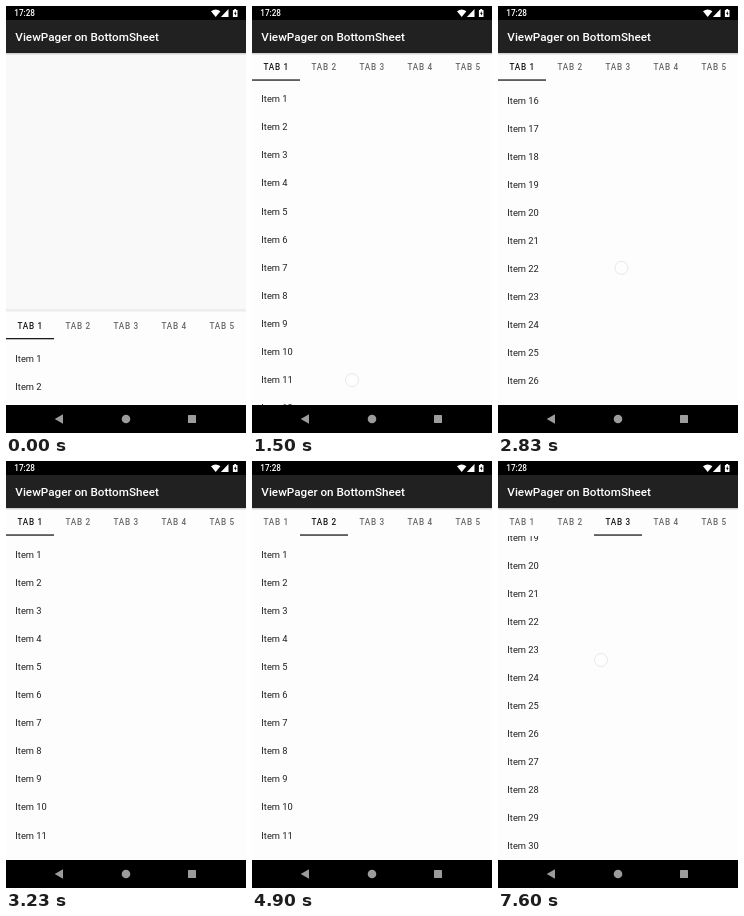
An HTML page that plays this animation: 240x427 px, repeating every 8 s.

```html
<!DOCTYPE html>
<html lang="en">
<head>
<meta charset="utf-8">
<title>ViewPager on BottomSheet</title>
<style>
  html, body { margin: 0; width: 100%; height: 100%; overflow: hidden; background: #000; }
  svg { display: block; width: 100vw; height: 100vh; font-family: Roboto, "Noto Sans", sans-serif; }
  .title { font-size: 11.68px; font-weight: 500; fill: #fff; }
  .clock { font-size: 8.17px; font-weight: 500; fill: #fff; }
  .tab { font-size: 8.17px; font-weight: 500; letter-spacing: .0892em; text-anchor: middle; }
  .item { font-size: 9.34px; fill: #202020; }
</style>
</head>
<body>
<svg viewBox="0 0 240 427">
  <defs>
    <clipPath id="listClip"><rect y="75" width="240" height="400"/></clipPath>
    <clipPath id="tabClip"><rect y="47" width="240" height="28"/></clipPath>
    <linearGradient id="up" x2="0" y2="1">
      <stop offset="0" stop-opacity="0"/><stop offset="1" stop-opacity=".08"/>
    </linearGradient>
    <linearGradient id="down" x2="0" y2="1">
      <stop offset="0" stop-opacity=".2"/><stop offset="1" stop-opacity="0"/>
    </linearGradient>
  </defs>

  <rect y="47" width="240" height="352" fill="#f9f9f9"/>
  <g id="sheet">
    <rect y="43" width="240" height="4" fill="url(#up)"/>
    <rect y="47" width="240" height="352" fill="#fdfdfd"/>
    <g clip-path="url(#listClip)"><g id="list"></g></g>
    <g clip-path="url(#tabClip)"><circle id="ripple" cy="61" r="0"/></g>
    <g id="tabs"></g>
    <rect id="bar" y="73.4" width="48" height="1.3" fill="#1c1c1c"/>
  </g>
  <circle id="touch" r="6.5" fill="#fff" fill-opacity=".4" stroke="#e9e9e9"/>

  <rect y="47" width="240" height="2.5" fill="url(#down)"/>
  <rect y="14" width="240" height="33" fill="#212121"/>
  <rect width="240" height="14" fill="#000"/>
  <text class="clock" x="8.3" y="10">17:28</text>
  <text class="title" x="9.34" y="35">ViewPager on BottomSheet</text>
  <g fill="#fff">
    <path d="M205 5.2Q209.7 1.6 214.4 5.2L209.7 11Z"/>
    <path d="M222.5 3V11H214.9Z"/>
    <path d="M228.2 3H230.2V3.9H231.5V11H226.9V3.9H228.2Z"/>
  </g>
  <path d="M229.7 5L228 7.8H229.1V9.8L230.6 7H229.7Z" fill="#000"/>

  <rect y="399" width="240" height="28" fill="#000"/>
  <g fill="#9c9c9c">
    <path d="M48.7 413L57 408.2V417.8Z"/>
    <circle cx="120" cy="413" r="4.3"/>
    <rect x="182" y="409" width="8" height="8" rx=".6"/>
  </g>
</svg>
<script>
const LOOP = 8000, PITCH = 28.03, MAX = 521.8, DROP = 258.6, TAB = 48;
const $ = id => document.getElementById(id);

const linear = p => p;
const out = n => p => 1 - (1 - p) ** n;
const inOut = p => p * p * (3 - 2 * p);

// Steps are [time, value, easing into this step].
function track(steps, t) {
  let [t0, v0] = steps[0];
  for (const [t1, v1, ease = linear] of steps) {
    if (t < t1) return v0 + (v1 - v0) * ease((t - t0) / (t1 - t0));
    [t0, v0] = [t1, v1];
  }
  return v0;
}

const sheetSteps = [[0, DROP], [500, DROP], [600, DROP - 90], [970, 0, out(3)]];
const scrollSteps = [
  [0, 0], [1500, 0], [1600, 80], [2030, MAX, out(1.13)],
  [2730, MAX], [2830, MAX - 100], [3230, 0, out(1.6)],
  [7330, 0], [7410, 100], [7600, MAX, out(1.3)]
];
const barSteps = [[0, 0], [4580, 0], [4870, TAB, inOut], [5810, TAB], [6100, 2 * TAB, inOut]];

// start, release, gone, then the path from x0,y0 to x1,y1
const touches = [
  [500, 620, 970, 108, 375, 112, 281],
  [1500, 1600, 2030, 100, 375, 98, 295],
  [2730, 2840, 3230, 118, 170, 124, 270],
  [4500, 4560, 4700, 72, 61, 72, 61],
  [5730, 5790, 5930, 120, 61, 120, 61],
  [7330, 7420, 8200, 104, 300, 103, 199]
];

// start, end, centre, opacity left at the end, removal time
const ripples = [[4500, 4900, 72, 0, 4900], [5730, 6130, 120, .022, 7330]];

function addText(parent, cls, x, y, text) {
  const el = document.createElementNS("http://www.w3.org/2000/svg", "text");
  el.setAttribute("class", cls);
  el.setAttribute("x", x);
  el.setAttribute("y", y);
  el.textContent = text;
  parent.append(el);
  return el;
}

const tabs = [0, 1, 2, 3, 4].map(i =>
  addText($("tabs"), "tab", i * TAB + 24.3, 64, `TAB ${i + 1}`));
for (let i = 0; i < 30; i++)
  addText($("list"), "item", 9.34, 97.2 + i * PITCH, `Item ${i + 1}`);

function set(el, attrs) {
  for (const name in attrs) el.setAttribute(name, attrs[name]);
}

function drawTouch(t) {
  const hit = touches.find(([start, , end]) => t >= start && t < end);
  if (!hit) return set($("touch"), { opacity: 0 });
  const [start, release, end, x0, y0, x1, y1] = hit;
  set($("touch"), {
    cx: track([[start, x0], [release, x1]], t),
    cy: track([[start, y0], [release, y1]], t),
    opacity: track([[end - 120, 1], [end, 0]], t)
  });
}

function drawRipple(t) {
  const hit = ripples.find(r => t >= r[0] && t < r[4]);
  if (!hit) return set($("ripple"), { opacity: 0 });
  const [start, end, cx, rest] = hit;
  set($("ripple"), {
    cx,
    r: track([[start, 8], [start + 220, 28, out(2)]], t),
    opacity: track([[start, .02], [start + 120, .07], [end, rest]], t)
  });
}

function draw(now) {
  const t = now % LOOP;
  set($("sheet"), { transform: `translate(0 ${track(sheetSteps, t)})` });
  set($("list"), { transform: `translate(0 ${-track(scrollSteps, t)})` });
  set($("bar"), { x: track(barSteps, t) });
  const current = t < 4580 ? 0 : t < 5810 ? 1 : 2;
  tabs.forEach((tab, i) => set(tab, { fill: i === current ? "#161616" : "#686868" }));
  drawRipple(t);
  drawTouch(t);
}

const began = performance.now();
function tick() {
  draw(performance.now() - began);
  requestAnimationFrame(tick);
}
tick();
</script>
</body>
</html>
```
